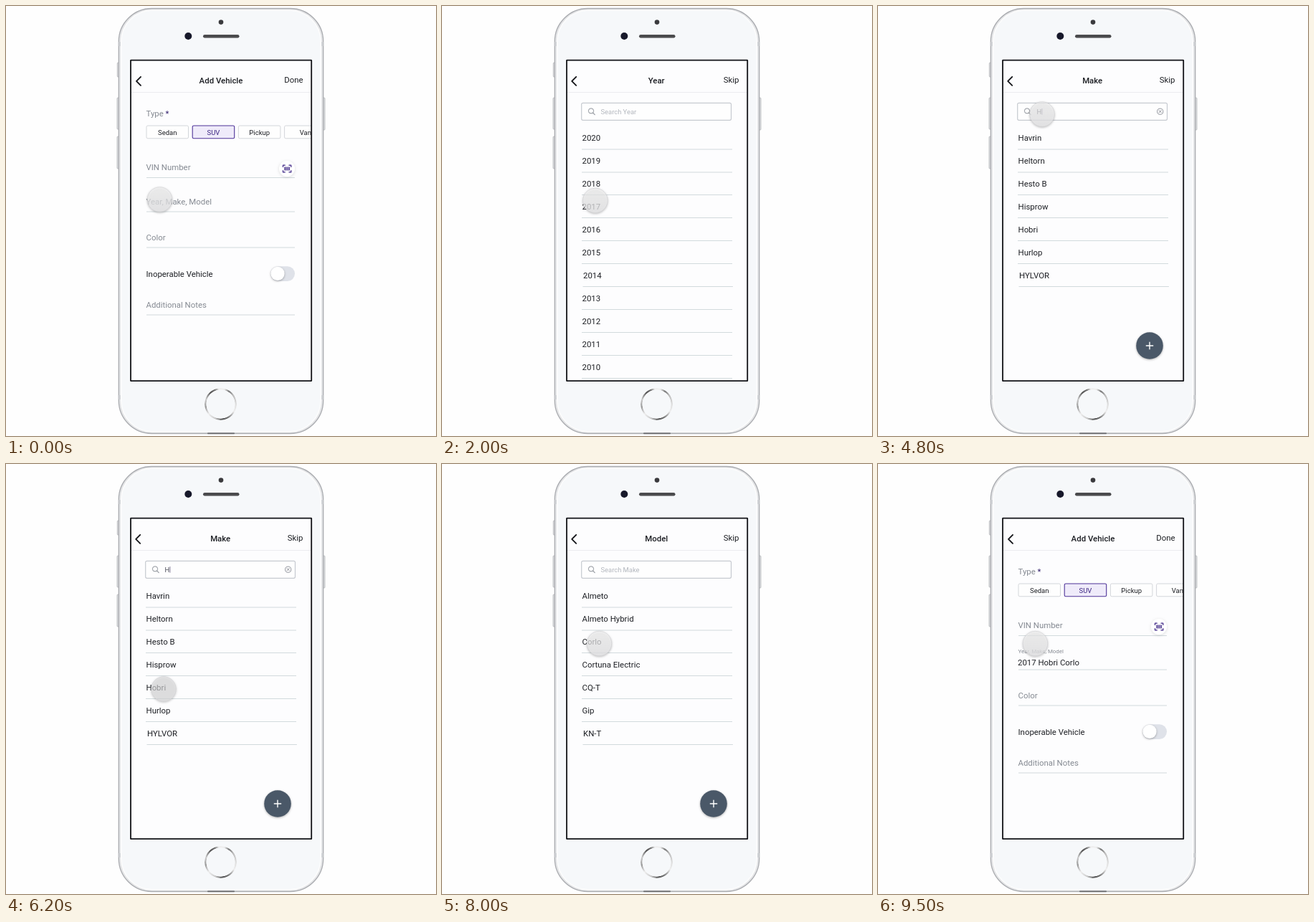
Recreate the animation shown at these times as an HTML page. Size 600 by 600 pixels, loop 9.6 s.

```html
<!DOCTYPE html>
<html lang="en">
<head>
<meta charset="utf-8">
<title>Add Vehicle</title>
<style>
html, body { margin: 0; width: 100%; height: 100%; overflow: hidden; background: #fefefe; }
svg { display: block; width: 100vw; height: 100vh; }
text { font: 11.4px Roboto, Arial, sans-serif; fill: #1d1f24; white-space: pre; }
.title { font-weight: 500; text-anchor: middle; }
.hint { fill: #858a92; }
.chip { font-size: 9.5px; text-anchor: middle; }
.search { font-size: 9.4px; }
.label { font-size: 7.9px; }
.rule { stroke: #d2dadd; stroke-width: 1.1; }
.line { fill: none; stroke-linecap: round; stroke-linejoin: round; }
.home { width: 45px; height: 45px; border-radius: 50%;
  background: conic-gradient(#eee 0 4%, #777 9%, #bbb 15%, #ddd 25%, #eee 33%, #777 42%, #555 48%, #ccc 56%, #eee 64%, #999 72%, #ccc 80%, #555 89%, #777 94%, #eee 98%);
  -webkit-mask: radial-gradient(circle, transparent 19.8px, #000 20.4px);
  mask: radial-gradient(circle, transparent 19.8px, #000 20.4px); }
#cursor { filter: drop-shadow(0 1px 1.5px rgba(0, 0, 0, .3)); }
.raised { filter: drop-shadow(0 1px 1.5px rgba(0, 0, 0, .3)); }
</style>
</head>
<body>
<svg id="stage" viewBox="0 0 600 600"></svg>
<script>
const LOOP = 9600, WIDTH = 252, HEIGHT = 447;

const text = (x, y, s, cls = '', extra = '') => `<text x="${x}" y="${y}" class="${cls}" ${extra}>${s}</text>`;
const rect = (x, y, w, h, r, paint) => `<rect x="${x}" y="${y}" width="${w}" height="${h}" rx="${r}" ${paint}/>`;
const circle = (x, y, r, paint) => `<circle cx="${x}" cy="${y}" r="${r}" ${paint}/>`;
const path = (d, color, width) => `<path d="${d}" class="line" stroke="${color}" stroke-width="${width}"/>`;
const rule = (y, x1, x2) => `<path d="M${x1} ${y}H${x2}" class="rule"/>`;

const header = (title, action, x) =>
  path(`M${x + 6} 98.8L${x} 104.8L${x + 6} 110.8`, '#15161a', 1.9) +
  text(x + 118, 108, title, 'title') +
  text(414.5, 107.3, action, '', 'text-anchor="end"') +
  '<path d="M175 120.5H425.5" stroke="#ebebef"/>';

const list = names => names.map((name, i) => {
  const dx = i === 6 ? 1.5 : 0, y = 188.4 + 32 * i - (i > 1 ? .5 : 0);
  return text(195.5 + dx, y, name) + rule(y + 11.6, 195 + dx, 405 + dx * .6);
}).join('');

const searchBox = content =>
  rect(194.7, 135.3, 208.8, 24, 2, 'fill="#fefefe" stroke="#c6cad0" stroke-width="1.2"') +
  circle(208, 146.4, 3.6, 'fill="none" stroke="#8d9299"') +
  path('M210.7 149.1L213.2 151.6', '#8d9299', 1.1) + content;

const placeholder = s => text(221.5, 150.6, s, 'search', 'style="fill:#b3b7be"');

const typed = text(221.5, 150.6, 'H', 'search', 'style="fill:#4a4d58"') +
  path('M228.9 143.5V151.3', '#6a6385', .8) +
  circle(393.7, 147.2, 4.1, 'fill="none" stroke="#858a92" stroke-width=".9"') +
  path('M392 145.5l3.4 3.4m0 -3.4l-3.4 3.4', '#858a92', .9);

const addButton = circle(379, 474, 18.8, 'fill="#4a5868" class="raised"') +
  path('M374.3 474h9.4M379 469.3v9.4', '#fff', 1.4);

const chip = (name, x, on) =>
  rect(x, 167, 58.5, 17.8, 1.8, on ? 'fill="#efebfa" stroke="#4d3398" stroke-width="1.1"' : 'fill="#fefefe" stroke="#d3d6da"') +
  text(x + 29.3, 179.5, name, 'chip', on ? 'style="fill:#3a2380"' : '');

const scanIcon = circle(392, 227, 11, 'fill="#fff" style="filter:drop-shadow(0 1px 2px rgba(0,0,0,.13))"') +
  path('M386.5 224.5v-2.3h2.8M395 222.2h2.8v2.3M397.8 229.6v2.3h-2.8M389.3 231.9h-2.8v-2.3', '#3d2585', 1.2) +
  '<path d="M389 224.5v5M391 224.5v5M393.2 224.5v5M395.3 224.5v5" stroke="#3d2585" stroke-width="1.3"/>';

const form = header('Add Vehicle', 'Done', 182) +
  text(195.5, 153.8, 'Type <tspan fill="#35226f">*</tspan>', 'hint') +
  ['Sedan', 'SUV', 'Pickup', 'Van'].map((s, i) => chip(s, 196 + 64.2 * i, i === 1)).join('') +
  text(195.5, 229.3, 'VIN Number', 'hint') + rule(239.5, 196, 403) + scanIcon +
  `<g id="empty">${text(195.5, 276.8, 'Year, Make, Model', 'hint')}</g>` +
  `<g id="filled">${text(195.5, 263.8, 'Year, Make, Model', 'hint label')}${text(195, 280.8, '2017 Hobri Corlo')}</g>` +
  rule(287, 196, 403) +
  text(195.5, 327, 'Color', 'hint') + rule(337, 196, 403) +
  text(195.5, 377.8, 'Inoperable Vehicle') +
  rect(369, 363.3, 34, 20.6, 10.3, 'fill="#dfe2e9"') +
  circle(379, 373.4, 9.6, 'fill="#fff" class="raised"') +
  text(195.5, 421, 'Additional Notes', 'hint') + rule(431, 196, 403);

const years = Array.from({ length: 11 }, (_, i) => 2020 - i);
const allMakes = ['Adelmo', 'AQ', 'Ardovel', 'Alk', 'Arven', 'Arda Pelino', ...Array(5).fill('Astrop')];
const hMakes = ['Havrin', 'Heltorn', 'Hesto B', 'Hisprow', 'Hobri', 'Hurlop', 'HYLVOR'];
const models = ['Almeto', 'Almeto Hybrid', 'Corlo', 'Cortuna Electric', 'CQ-T', 'Gip', 'KN-T'];

const sheet = rect(174, 64, WIDTH, 12, 0, 'fill="url(#shade)"') +
  rect(174, 76, WIDTH, HEIGHT + 1, 0, 'fill="#fdfdfe"') +
  `<g id="year">${header('Year', 'Skip', 181.2)}${searchBox(placeholder('Search Year'))}${list(years)}</g>` +
  `<g id="make">${header('Make', 'Skip', 181.2)}
    <g id="all">${searchBox(placeholder('Search Make'))}${list(allMakes)}</g>
    <g id="found">${searchBox(typed)}${list(hMakes)}</g>${addButton}</g>` +
  `<g id="model">${header('Model', 'Skip', 181.2)}${searchBox(placeholder('Search Make'))}${list(models)}${addButton}</g>`;

const button = (x, y, h) => rect(x, y, 3, h, 1, 'fill="#dcdde0" stroke="#aeb0b4" stroke-width=".7"');
const bands = [50, 543].map(y => rect(157.5, y, 4, 6, 0, 'fill="#d3d5d8"') + rect(438.5, y, 4, 6, 0, 'fill="#d3d5d8"')).join('');

const phone = button(155.3, 79, 20) + button(155, 128, 44) + button(155, 182, 45) + button(442, 128, 45) +
  rect(157.3, 3.5, 285.4, 593, 46, 'fill="#e4e5e7" stroke="#a9abaf" stroke-width="1.3"') + bands +
  rect(160.8, 6, 278.4, 588, 43.5, 'fill="#f6f8fa" stroke="#fdfdfd" stroke-width="1.6"') +
  rect(281, 595.6, 38, 1.6, .8, 'fill="#68696c"') +
  circle(300, 22.6, 3.3, 'fill="#3a3a3d"') + circle(254.3, 42, 5, 'fill="#17182a"') +
  rect(275, 40, 50.5, 4.4, 2.2, 'fill="#4b4b4d"') +
  '<foreignObject x="277" y="533" width="45" height="45"><div class="home"></div></foreignObject>';

stage.innerHTML = `<defs>
  <clipPath id="screen">${rect(174, 76, WIDTH, HEIGHT, 0, '')}</clipPath>
  <linearGradient id="shade" x2="0" y2="1"><stop stop-opacity="0"/><stop offset="1" stop-opacity=".13"/></linearGradient>
  <linearGradient id="glass" x2="0" y2="1"><stop stop-color="#fafafa" stop-opacity=".6"/><stop offset="1" stop-color="#e9e9eb" stop-opacity=".78"/></linearGradient>
  </defs>${phone}
  ${rect(174, 76, WIDTH, HEIGHT, 0, 'fill="#fdfdfe"')}
  <g clip-path="url(#screen)">${form}<g id="sheet">${sheet}</g></g>
  ${rect(174, 75.6, 252.2, 447.6, .5, 'fill="none" stroke="#111216" stroke-width="1.8"')}
  ${circle(0, 0, 17.2, 'id="cursor" stroke="#d2d2d5" stroke-width=".7"')}`;

const $ = id => document.getElementById(id);
const show = (id, on) => $(id).style.display = on ? '' : 'none';
const move = (id, x, y) => $(id).setAttribute('transform', `translate(${x} ${y})`);
const progress = (t, start, length) => Math.min(1, Math.max(0, (t - start) / length));
const easeOut = p => 1 - (1 - p) ** 2;
const easeInOut = p => p * p * (3 - 2 * p);

// start, end, x, y
const moves = [[1850, 2500, 210, 280.5], [3750, 4650, 229, 151], [5250, 6150, 220, 314], [7150, 7950, 219.5, 250.5]];

function draw(t) {
  const drop = HEIGHT * (1 - easeOut(progress(t, 484, 600)) + easeOut(progress(t, 8110, 600)));
  const toMake = easeOut(progress(t, 2656, 450)), toModel = easeOut(progress(t, 6340, 450));
  show('sheet', drop < HEIGHT);
  move('sheet', 0, drop);
  move('year', -WIDTH * toMake, 0);
  move('make', WIDTH * (1 - toMake - toModel), 0);
  move('model', WIDTH * (1 - toModel), 0);
  show('all', t < 4800);
  show('found', t >= 4800);
  show('empty', t < 8110);
  show('filled', t >= 8110);

  let x = 214.5, y = 270;
  for (const [start, end, toX, toY] of moves) {
    const p = easeInOut(progress(t, start, end - start));
    x += (toX - x) * p;
    y += (toY - y) * p;
  }
  move('cursor', x, y);
  const pressed = t >= 6150 && t < 6400;
  $('cursor').setAttribute('fill', pressed ? 'rgba(228,228,230,.62)' : 'url(#glass)');
}

const begin = performance.now();
function tick() {
  draw((performance.now() - begin) % LOOP);
  requestAnimationFrame(tick);
}
tick();
</script>
</body>
</html>
```
